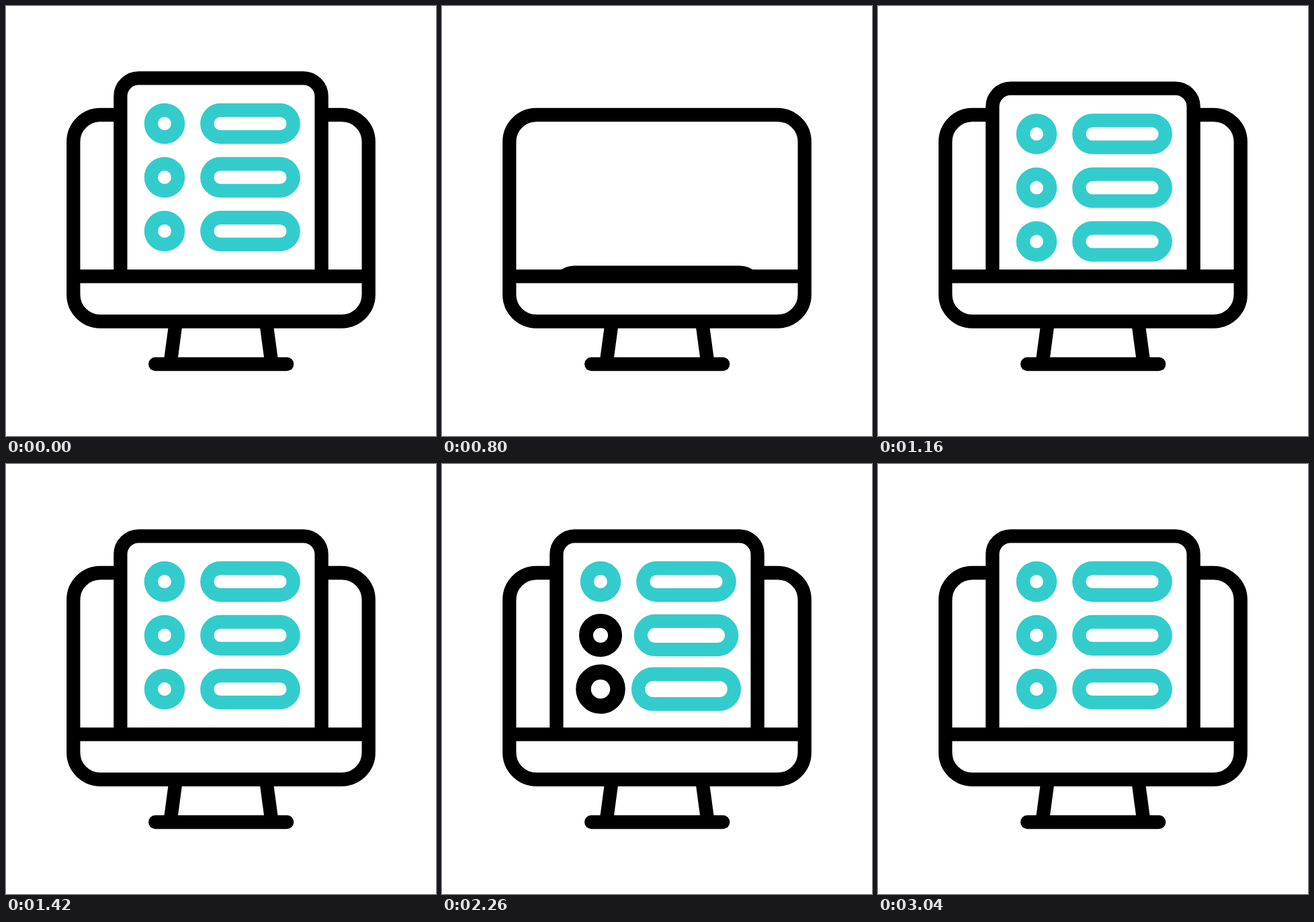
These frames come from a looping animation (640 by 640 pixels, 3260 ms). An HTML page:

```html
<!DOCTYPE html>
<html lang="en">
<head>
<meta charset="utf-8">
<title>List on a monitor</title>
<style>
  html, body { margin: 0; width: 100%; height: 100%; overflow: hidden; background: #fff; }
  svg { display: block; width: 100vw; height: 100vh; fill: none; stroke: #000; stroke-width: 20.3; }
</style>
</head>
<body>
<svg viewBox="0 0 640 640">
  <clipPath id="above"><rect width="640" height="402"/></clipPath>
  <rect x="100.3" y="162" width="439.4" height="307.5" rx="40"/>
  <g clip-path="url(#above)">
    <g id="panel">
      <path fill="#fff" d="M170.4 520V134.3a27 27 0 0 1 27-27H442.6a27 27 0 0 1 27 27V520"/>
    </g>
  </g>
  <path d="M100 402.4H540M252.9 470L244.4 533M387.1 470L395.6 533"/>
  <path stroke-linecap="round" d="M222.2 533H418.2"/>
</svg>
<script>
const LOOP = 3260, STEP = 20, TEAL = '#3cc';
const HIDDEN = 305, HOP = -64;
const panel = document.getElementById('panel');

const clamp = x => Math.min(1, Math.max(0, x));
const span = (t, from, to) => clamp((t - from) / (to - from));
const ease = x => (1 - Math.cos(Math.PI * x)) / 2;

// rises from 0 to 1, then falls back to 0
const bell = (t, start, rise, fall) =>
  ease(span(t, start, start + rise)) * (1 - ease(span(t, start + rise, start + rise + fall)));

function add(tag, attrs) {
  const el = document.createElementNS('http://www.w3.org/2000/svg', tag);
  set(el, attrs);
  return panel.appendChild(el);
}

function set(el, attrs) {
  for (const key in attrs) el.setAttribute(key, attrs[key]);
}

const rows = [0, 1, 2].map(i => ({
  y: 175 + 80 * i,
  dotStart: 1400 + 200 * i,
  dotFall: i ? 540 : 460,
  barStart: 1560 + 200 * i,
  flashes: i > 0,
  dot: add('circle', { cx: 236, cy: 175 + 80 * i }),
  bar: add('rect', { stroke: TEAL })
}));

function panelShift(t) {
  if (t < 800) return HIDDEN * (1 - (1 - span(t, 210, 540)) ** 2);
  if (t < 1400) return HIDDEN * (1 - span(t, 790, 1400)) ** 3.2;
  return HOP * bell(t, 2720, 220, 100);
}

function drawRow(row, t) {
  const k = bell(t, row.dotStart, 280, row.dotFall);
  const peak = row.dotStart + 280;
  const dark = row.flashes && t >= peak && t < peak + row.dotFall;
  set(row.dot, {
    r: 20.1 * (1 + 0.36 * k),
    stroke: dark ? '#000' : TEAL,
    'stroke-width': 20.3 + (dark ? 3 * k : 0)
  });

  const size = 1 + 0.115 * bell(t, row.barStart, 260, 460);
  const w = 128.4 * size, h = 40 * size;
  set(row.bar, { x: 363.5 - w / 2, y: row.y - h / 2, width: w, height: h, rx: h / 2 });
}

function draw(now) {
  const t = Math.floor((now % LOOP) / STEP) * STEP;
  panel.setAttribute('transform', `translate(0 ${panelShift(t)})`);
  rows.forEach(row => drawRow(row, t));
}

const begin = performance.now();
function tick() {
  draw(performance.now() - begin);
  requestAnimationFrame(tick);
}
tick();
</script>
</body>
</html>
```
